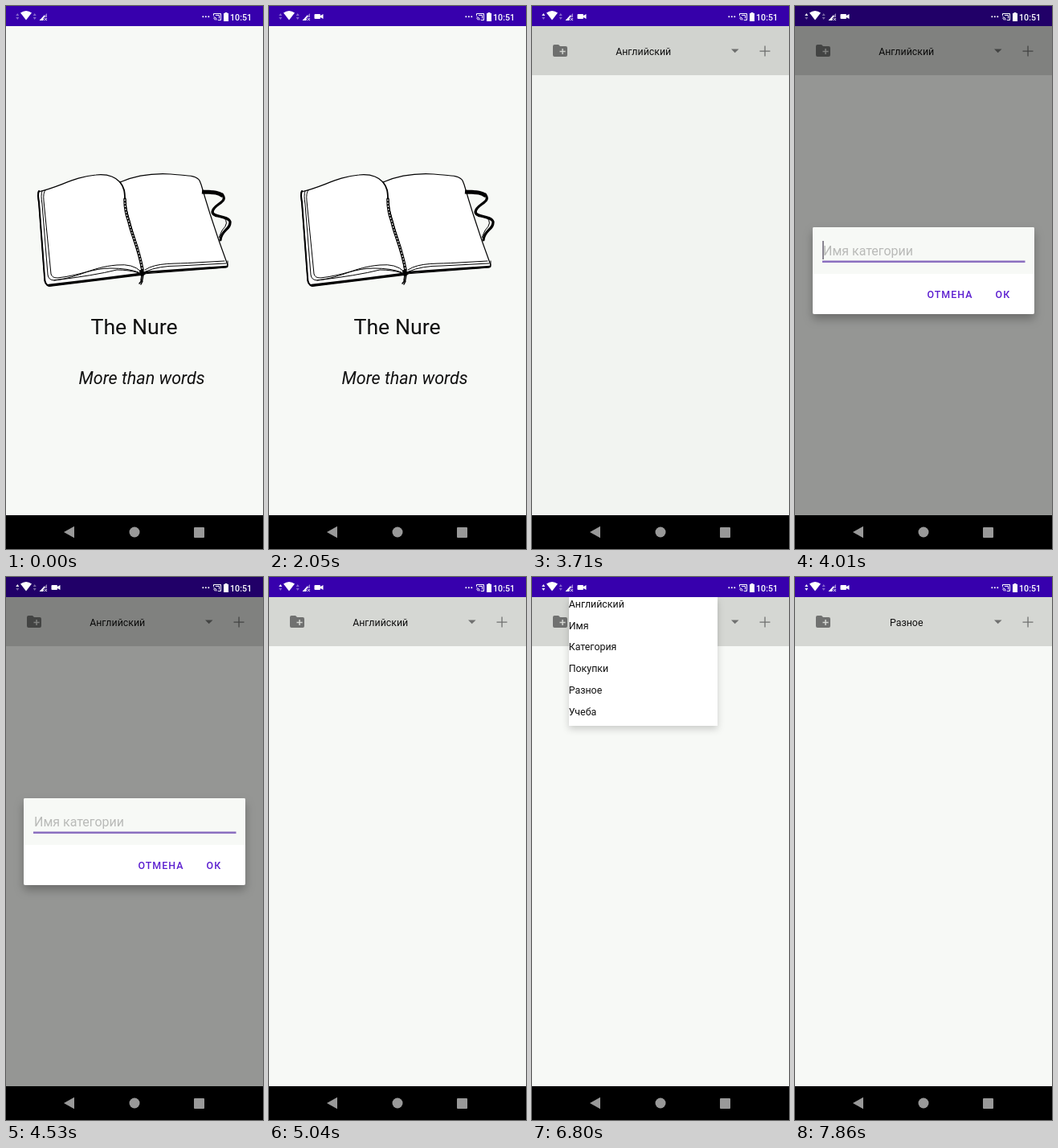
Animation of 320 by 675 pixels, one loop 8000 ms. Source, as an HTML page:

```html
<!DOCTYPE html>
<html lang="ru">
<head>
<meta charset="utf-8">
<title>Notebook app</title>
<style>
  html, body { margin: 0; width: 100%; height: 100%; overflow: hidden; background: #000; }
  svg { display: block; width: 100vw; height: 100vh; }
  text { font: 12.4px Roboto, sans-serif; fill: #111; white-space: pre; }
  .line { fill: none; stroke: #000; stroke-linecap: round; stroke-linejoin: round; }
  .button { font-weight: 500; letter-spacing: 1.1px; fill: #5c1fd0; }
</style>
</head>
<body>
<svg viewBox="0 0 320 675">
  <defs>
    <clipPath id="reveal"><rect id="revealBox" width="320" height="720"/></clipPath>
    <filter id="shadow" x="-20%" y="-30%" width="140%" height="170%">
      <feDropShadow dx="0" dy="6" stdDeviation="6" flood-opacity=".28"/>
    </filter>
    <filter id="soft" x="-20%" y="-20%" width="140%" height="150%">
      <feDropShadow dx="0" dy="4" stdDeviation="4" flood-opacity=".18"/>
    </filter>
    <g id="window">
      <rect width="320" height="720"/>
      <rect width="320" height="25" fill="#3700ad"/>
      <rect y="25" width="320" height="608" fill="#f7f9f6"/>
    </g>
  </defs>

  <g id="splash">
    <use href="#window"/>
    <g class="line">
      <path fill="#fff" stroke-width="1.2" d="M40 231C65 226 85 212 112 210Q132 208 142 219Q170 207 205 209C225 211 237 210 241 217L243 222C252 253 264 290 276 322L274 325L170 333L54 348Q48 347 48 338Z"/>
      <path stroke-width="2" d="M41 230Q39 235 41 244L48 337Q48 347 54 348L168 334"/>
      <path stroke-width="2.4" d="M53 347L112 340L166 333M174 331L275 324"/>
      <path stroke-width="1" d="M45 230Q43 235 45 246L52 334Q53 341 60 341C94 337 104 325 138 322Q158 320 168 330M49 229Q46 232 47 242L56 333Q57 338 64 338C92 335 108 326 130 326Q152 326 165 331M60 341Q110 335 138 328Q154 328 166 332"/>
      <path stroke-width="1" d="M173 328C188 318 211 321 236 319L272 317M174 330Q190 323 215 323L274 320M276 317V324"/>
      <path stroke-width="1.8" d="M142 219C151 230 146 239 150 254Q157 282 164 301L169 327"/>
      <path stroke-width="3.6" d="M148 240Q148 255 153 268C157 286 165 300 170 328"/>
      <path stroke="#fff" stroke-width="1.3" stroke-dasharray=".8 3" d="M148 241Q148 255 153 268C157 286 165 300 170 328"/>
      <path stroke-width="4" d="M168 330L172 332L169 334Z"/>
      <path stroke-width="1.5" d="M171 334L170 340L166 345M169 335L168 341M170 342L168 346"/>
      <path stroke-width="5" stroke-linecap="butt" d="M244 231C255 232 262 230 270 236"/>
      <path stroke-width="3.2" d="M269 234C278 244 258 246 257 256C257 263 276 260 279 268C280 278 268 278 267 291"/>
      <path stroke-width="1" d="M261 249Q255 257 261 262M271 263Q279 269 269 279L265 288"/>
    </g>
    <text x="105.5" y="408" style="font-size:26.7px">The Nure</text>
    <text x="90.5" y="469.500" style="font-size:21.550px;font-style:italic">More than words</text>
  </g>

  <g id="main">
    <g clip-path="url(#reveal)">
      <use href="#window"/>
      <rect y="25" width="320" height="61" fill="#d5d7d3"/>
      <g fill="#707170">
        <path fill-rule="evenodd" d="M28 48H33L35 50H42Q44 50 44 52V61Q44 63 42 63H28Q26 63 26 61V50Q26 48 28 48ZM37.300 53V55.800H34.500V57.300H37.300V60H38.800V57.300H41.600V55.800H38.800V53Z"/>
        <path d="M248 53.500H257.500L252.700 58.300ZM289.400 49.500H290.700V55.400H296.500V56.700H290.700V62.500H289.400V56.700H283.500V55.400H289.400Z"/>
      </g>
      <text id="label" x="138.700" y="60.500" text-anchor="middle"></text>
    </g>
  </g>

  <g id="menu">
    <rect x="46" y="25" width="185" height="160" fill="#fff" filter="url(#soft)"/>
  </g>

  <rect id="dim" width="320" height="675"/>
  <g id="dialog">
    <rect x="22" y="275" width="276" height="108" rx="2" fill="#fff" filter="url(#shadow)"/>
    <path d="M22 333V277Q22 275 24 275H296Q298 275 298 277V333Z" fill="#f7f9f6"/>
    <text x="35" y="310" style="font-size:16px;fill:#b9bab8">Имя категории</text>
    <rect x="34" y="316.500" width="252.500" height="2.500" fill="#8b6fc0"/>
    <rect id="cursor" x="34" y="292" width="2" height="23" fill="#8a8592"/>
    <text class="button" x="164.500" y="363">ОТМЕНА</text>
    <text class="button" x="249.500" y="363">ОК</text>
  </g>

  <g fill="#fff">
    <path d="M18 8.500Q25 3.500 32 8.500L25 17.500Z"/>
    <path id="up" d="M12.300 12L14.300 9L16.300 12Z"/>
    <path id="down" d="M12.300 14L14.300 17L16.300 14Z"/>
    <path opacity=".4" d="M33.700 12L35.700 9L37.700 12ZM33.700 14L35.700 17L37.700 14Z"/>
    <path opacity=".5" d="M42 18L51 9V14H47V18Z"/>
    <path d="M41.500 18L48 11V14L46.500 15V18Z"/>
    <path d="M48 15L51 18M51 15L48 18" stroke="#fff"/>
    <path id="camera" d="M57.500 10H63Q64 10 64 11V12L67.500 10V16L64 14V15Q64 16 63 16H57.500Q56.500 16 56.500 15V11Q56.500 10 57.500 10Z"/>
    <circle cx="245.300" cy="13.300" r="1"/><circle cx="248.800" cy="13.300" r="1"/><circle cx="252.300" cy="13.300" r="1"/>
    <path fill="none" stroke="#fff" d="M258.500 12V9.500H267.500V17.500H264M258.500 13.500Q262 14 262.500 17.500M258.500 15.500Q260.500 15.500 260.500 17.500M261 11.500H265.500V15.500"/>
    <path d="M272.500 9V8H275.500V9H277V19H271V9Z"/>
    <text x="279" y="18" style="font-size:10.700px;font-weight:500;fill:#fff">10:51</text>
  </g>
  <g fill="#999">
    <path d="M72 654L85 646.800V661.200Z"/>
    <circle cx="160" cy="654" r="6.500"/>
    <rect x="234" y="648" width="13" height="13" rx="1"/>
  </g>
</svg>
<script>
const LOOP = 8000;
const ITEMS = ["Английский", "Имя", "Категория", "Покупки", "Разное", "Учеба"];
const $ = id => document.getElementById(id);
const set = (id, name, value) => $(id).setAttribute(name, value);
const ramp = (t, from, to) => Math.min(1, Math.max(0, (t - from) / (to - from)));
const pulse = (t, a, b, c, d) => ramp(t, a, b) - ramp(t, c, d);

// cubic-bezier(.4, 0, .2, 1), solved by bisection
function ease(x) {
  let lo = 0, hi = 1, s = 0.5;
  for (let i = 0; i < 18; i++) {
    s = (lo + hi) / 2;
    const bx = 1.2 * s * (1 - s) ** 2 + 0.6 * s * s * (1 - s) + s ** 3;
    if (bx < x) lo = s; else hi = s;
  }
  return x <= 0 ? 0 : x >= 1 ? 1 : s * s * (3 - 2 * s);
}

function fade(id, alpha) {
  set(id, "opacity", alpha);
  set(id, "visibility", alpha > 0 ? "visible" : "hidden");
}

ITEMS.forEach((name, i) => {
  const item = document.createElementNS("http://www.w3.org/2000/svg", "text");
  item.setAttribute("x", 45.7);
  item.setAttribute("y", 38 + i * 26.7);
  item.textContent = name;
  $("menu").append(item);
});

function draw(t) {
  // the new screen rises and unfolds from the bottom
  const open = ease(ramp(t, 2612, 3037));
  set("splash", "transform", `translate(0 ${-14.5 * open})`);
  set("main", "transform", `translate(0 ${27 * (1 - open)})`);
  set("main", "visibility", open > 0 ? "visible" : "hidden");
  set("revealBox", "y", 647 * (1 - open) ** 1.75);
  $("label").textContent = ITEMS[t < 6230 ? 0 : t < 7560 ? 1 : 4];

  fade("dim", 0.4 * pulse(t, 3700, 3930, 4880, 5030));
  fade("dialog", pulse(t, 3720, 3870, 4880, 5020));
  const size = 0.9 + 0.1 * ease(ramp(t, 3720, 3940));
  set("dialog", "transform", `translate(160 329) scale(${size}) translate(-160 -329)`);
  fade("cursor", t >= 3720 && t < 4460 ? 1 : 0);

  fade("menu", pulse(t, 5450, 5600, 6230, 6400) + pulse(t, 6650, 6790, 7560, 7760));

  fade("camera", t >= 200 ? 1 : 0);
  set("up", "opacity", t >= 3610 ? 1 : 0.4);
  set("down", "opacity", t >= 5810 ? 1 : 0.4);
}

function tick() {
  draw(performance.now() % LOOP);
  requestAnimationFrame(tick);
}
tick();
</script>
</body>
</html>
```
